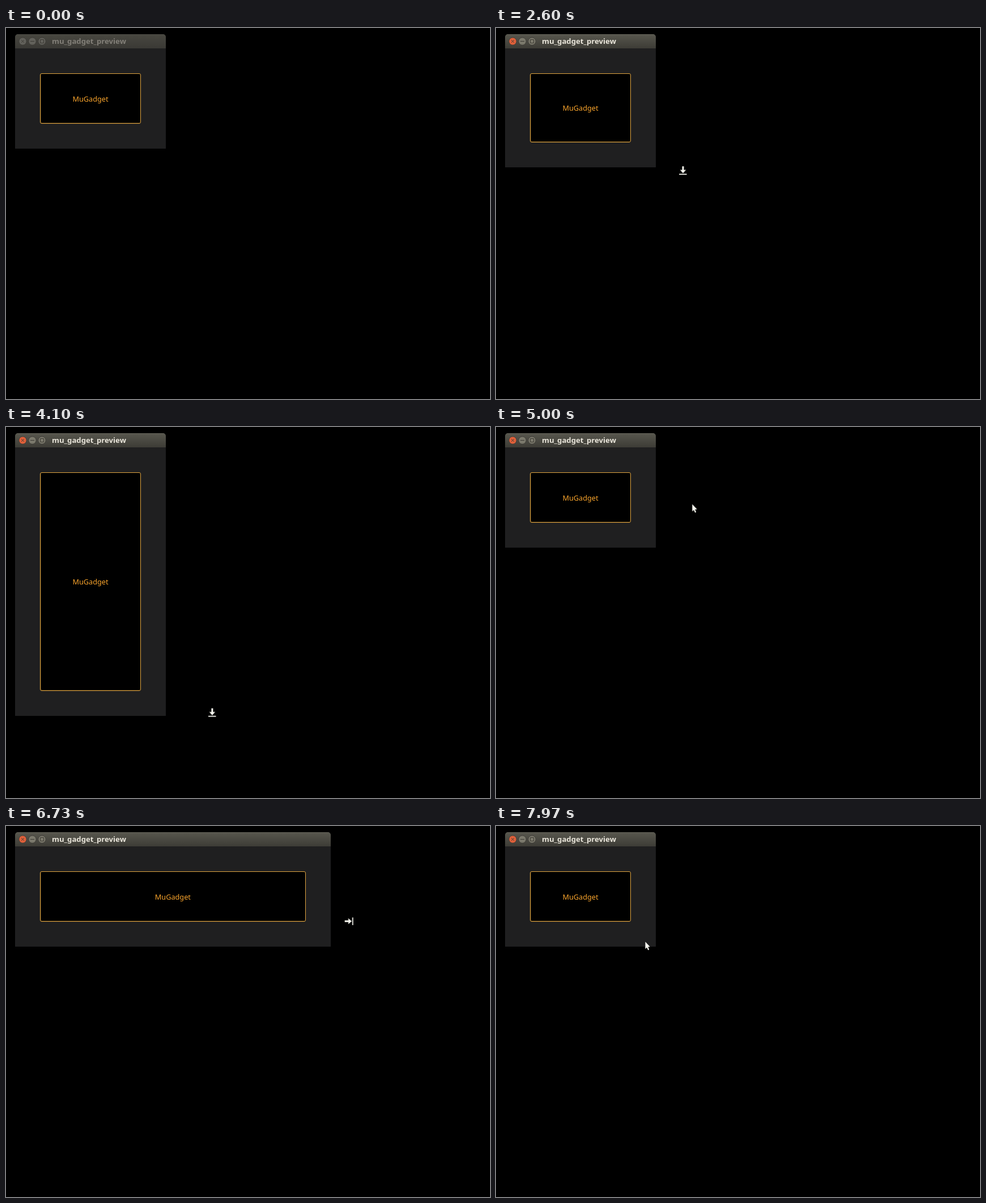
Write an HTML page that moves like this. It is 854 px wide and 655 px high and loops after 8 s.

```html
<!DOCTYPE html>
<html lang="en">
<head>
<meta charset="utf-8">
<title>Window resizing</title>
<style>
  html, body { margin: 0; width: 100%; height: 100%; overflow: hidden; background: #000; }

  .window, .pointer, .pointer g { animation: 8s linear infinite; }

  .window {
    position: absolute; left: 16px; top: 11px; width: 266px; height: 202px;
    overflow: hidden; border-radius: 5px 5px 0 0; background: #1f1f20;
    animation-name: focus, stretch-height, stretch-width;
    animation-timing-function: step-end, linear, linear;
  }
  .bar {
    height: 25px; box-sizing: border-box; border-top: 1px solid var(--edge);
    background: linear-gradient(var(--bar-top), var(--bar-low));
  }
  .bar svg { position: absolute; left: 0; top: 0; }
  .bar circle { stroke: #3a3934; stroke-width: .8; }
  .bar path { fill: none; stroke: #3a3832; stroke-width: 1; }
  .title {
    position: absolute; left: 65px; top: 0; white-space: nowrap;
    font: bold 13.2px/25px "Noto Sans", sans-serif; color: var(--title);
  }
  .frame {
    position: absolute; left: 44px; top: 69px; right: 44px; bottom: 44px;
    box-sizing: border-box; border: 1px solid #dfa440; border-radius: 3px;
    box-shadow: inset 1px -1px #dfa44040;
    display: flex; align-items: center; justify-content: center;
    background: #000; color: #f9a42c; font: 12.7px "Noto Sans", sans-serif;
  }

  .stage { position: absolute; left: 0; top: 0; fill: #f8f8f0; }
  .pointer { animation-name: travel; }
  .pointer g { animation-timing-function: step-end; }
  .pointer .arrow { animation-name: show-arrow; stroke: #000; stroke-width: 1; paint-order: stroke; }
  .pointer .down { animation-name: show-down; }
  .pointer .right { animation-name: show-right; }

  @keyframes focus {
    0% { --title: #827f78; --close: #62615b; --button: #62615b; --edge: #4e4d47; --bar-top: #484740; --bar-low: #3a3935; }
    7.5%, 100% { --title: #e9e5da; --close: #e0603a; --button: #7b796c; --edge: #66655b; --bar-top: #57564d; --bar-low: #3d3c36; }
  }
  @keyframes stretch-height {
    0%, 29.125% { height: 202px; }
    32.5% { height: 235px; }
    39.125%, 39.625% { height: 336px; }
    42.875% { height: 421px; }
    45.5% { height: 480px; }
    48.375%, 50.375% { height: 506px; }
    51.25% { height: 499px; }
    53.75% { height: 442px; }
    56.25% { height: 350px; }
    58.75% { height: 258px; }
    60.375% { height: 205px; }
    60.875%, 100% { height: 202px; }
  }
  @keyframes stretch-width {
    0%, 79.625% { width: 266px; }
    81.875% { width: 358px; }
    84.125% { width: 556px; }
    86.25% { width: 688px; }
    87.5% { width: 708px; }
    89.625% { width: 676px; }
    93% { width: 448px; }
    96.25% { width: 272px; }
    97%, 100% { width: 266px; }
  }
  @keyframes travel {
    0%, .375% { transform: translate(686px, 271px); }
    5% { transform: translate(430px, 221px); }
    10.375% { transform: translate(266px, 190px); }
    20.875%, 22.5% { transform: translate(279px, 211px); }
    25%, 29.125% { transform: translate(282px, 218px); }
    32.5% { transform: translate(330px, 259px); }
    39.125%, 39.625% { transform: translate(368px, 358px); }
    42.875% { transform: translate(364px, 444px); }
    45.5% { transform: translate(365px, 501px); }
    48.375%, 50.375% { transform: translate(365px, 521px); }
    51.25% { transform: translate(364px, 512px); }
    53.75% { transform: translate(362px, 445px); }
    56.25% { transform: translate(358px, 346px); }
    58.75% { transform: translate(353px, 242px); }
    60.375% { transform: translate(350px, 170px); }
    62.5% { transform: translate(346px, 136px); }
    66% { transform: translate(306px, 140px); }
    70.875% { transform: translate(267px, 154px); }
    75.875%, 79.625% { transform: translate(291px, 168px); }
    81.875% { transform: translate(396px, 168px); }
    84.125% { transform: translate(612px, 168px); }
    86.25% { transform: translate(726px, 168px); }
    87.25% { transform: translate(731px, 168px); }
    89.625% { transform: translate(684px, 170px); }
    93% { transform: translate(440px, 178px); }
    96.25% { transform: translate(274px, 190px); }
    99.625%, 100% { transform: translate(263px, 204px); }
  }
  @keyframes show-arrow {
    0% { opacity: 0; }
    .375% { opacity: 1; }
    23.75% { opacity: 0; }
    61.5% { opacity: 1; }
    74.5% { opacity: 0; }
    97.5%, 100% { opacity: 1; }
  }
  @keyframes show-down {
    0% { opacity: 0; }
    23.75% { opacity: 1; }
    61.5%, 100% { opacity: 0; }
  }
  @keyframes show-right {
    0% { opacity: 0; }
    74.5% { opacity: 1; }
    97.5%, 100% { opacity: 0; }
  }
</style>
</head>
<body>
  <div class="window">
    <div class="bar">
      <svg width="60" height="25">
        <circle cx="13.5" cy="12.5" r="6.6" style="fill: var(--close)"/>
        <circle cx="30.5" cy="12.5" r="6.6" style="fill: var(--button)"/>
        <circle cx="47.5" cy="12.5" r="6.6" style="fill: var(--button)"/>
        <path d="M11.2 10.2l4.6 4.6m0-4.6l-4.6 4.6M27 12.5h7M44.5 9.5h6v6h-6z"/>
      </svg>
      <span class="title">mu_gadget_preview</span>
    </div>
    <div class="frame">MuGadget</div>
  </div>

  <svg class="stage" width="854" height="655">
    <defs>
      <path id="push" d="M-1.6-15h3v6.6l3.8-.4L-.1-2.8-5.4-8.8l3.8 .4zM-7-1.7H6.5V.1H-7z"/>
    </defs>
    <g class="pointer">
      <g class="arrow"><path d="M.4 .2V13L3.2 10.4 5.3 15.2 7.3 14.3 5.3 9.6 8.9 9.2z"/></g>
      <g class="down"><use href="#push"/></g>
      <g class="right"><use href="#push" transform="rotate(-90)"/></g>
    </g>
  </svg>
</body>
</html>
```
